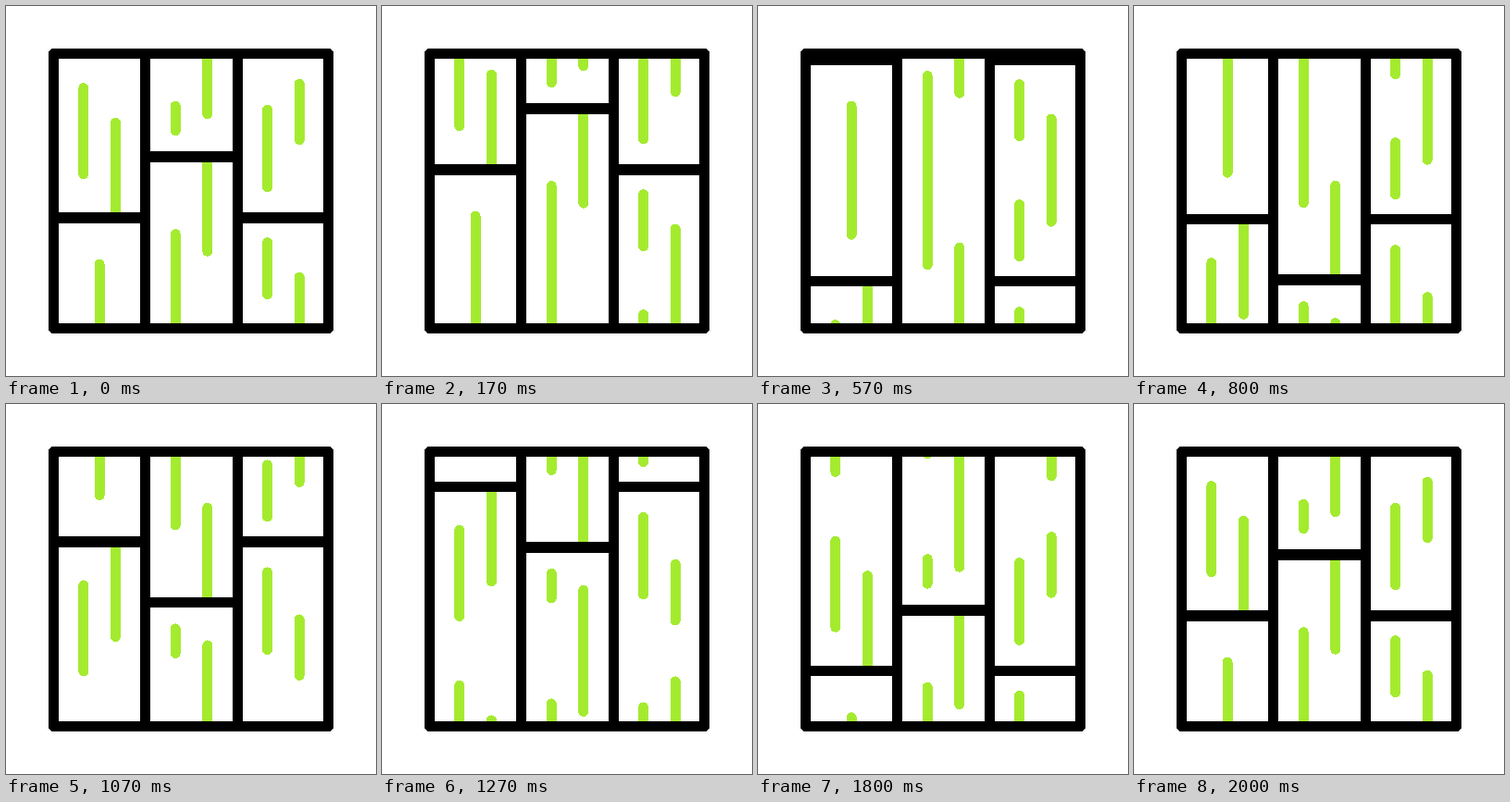
An HTML page that plays this animation: 400 by 400 pixels, repeating every 2020 ms.

```html
<!DOCTYPE html>
<html lang="en">
<head>
<meta charset="utf-8">
<title>Sliding planks</title>
<style>
  html, body { margin: 0; width: 100%; height: 100%; overflow: hidden; background: #fff; }
  svg { display: block; width: 100vw; height: 100vh; shape-rendering: crispEdges; }
  path { fill: none; stroke: #000; stroke-width: 11; stroke-linejoin: round; }
  .grain { stroke: #a4eb2f; stroke-linecap: round; }
  .seam { stroke-width: 11.6; }
</style>
</head>
<body>
<svg viewBox="0 0 400 400">
  <clipPath id="window"><path d="M51 51H349V349H51Z"/></clipPath>
  <g clip-path="url(#window)">
    <g id="strip"></g>
  </g>
  <path d="M51.5 51.5H348.5V348.5H51.5ZM150.5 51.5V348.5M250.5 51.5V348.5"/>
</svg>
<script>
  const LOOP = 2020;       // ms
  const STEPS = 80;        // moves per loop
  const PERIOD = 595;      // height of the repeating floor
  const PITCH = PERIOD / 2; // distance between plank middles
  const MIDDLE = 348.75;
  const COLUMN = 99.4;
  const LANE = 17.3;

  // Each column alternates two planks; `half` is half the first one's length.
  // A grain is [lane, near, far], measured from the plank's middle and mirrored.
  // Without a far end it runs to the seam.
  const columns = [
    { half: 119.9, planks: [[[0, 0, 69.5]], [[-1, 37.5, 130.5], [1, 75]]] },
    { half: 185.5, planks: [[[-1, 0, 102], [1, 83.5]], [[-1, 57, 83.5], [1, 0, 65.5]]] },
    { half: 119.9, planks: [[[-1, 37, 93], [1, 0, 55.5]], [[-1, 61, 144.5], [1, 33, 93.5]]] }
  ];

  const strip = document.getElementById('strip');
  const lines = { grain: '', seam: '' };

  function addPlank(x, middle, half, grains) {
    for (const side of [-1, 1]) {
      for (const [lane, near, far = half] of grains) {
        lines.grain += `M${x + lane * LANE} ${middle + side * near}V${middle + side * far}`;
      }
    }
    lines.seam += `M${x - COLUMN / 2} ${middle + half}h${COLUMN}`;
  }

  columns.forEach(({ half, planks }, c) => {
    const x = 200.5 + (c - 1) * COLUMN;
    for (let n = -2; n < 4; n++) {
      const odd = n & 1;
      addPlank(x, MIDDLE + n * PITCH, odd ? PITCH - half : half, planks[odd]);
    }
  });

  for (const [name, d] of Object.entries(lines)) {
    const path = document.createElementNS('http://www.w3.org/2000/svg', 'path');
    path.setAttribute('class', name);
    path.setAttribute('d', d);
    strip.append(path);
  }

  // Moves alternate between 20 ms and 30 ms holds.
  function stepAt(time) {
    return 2 * Math.floor(time / 50) + (time % 50 >= 20 ? 1 : 0);
  }

  const start = performance.now();

  function draw() {
    const time = (performance.now() - start) % LOOP;
    const shift = (stepAt(time) % STEPS) * PERIOD / STEPS;
    strip.setAttribute('transform', `translate(0 ${-shift})`);
    requestAnimationFrame(draw);
  }
  draw();
</script>
</body>
</html>
```
